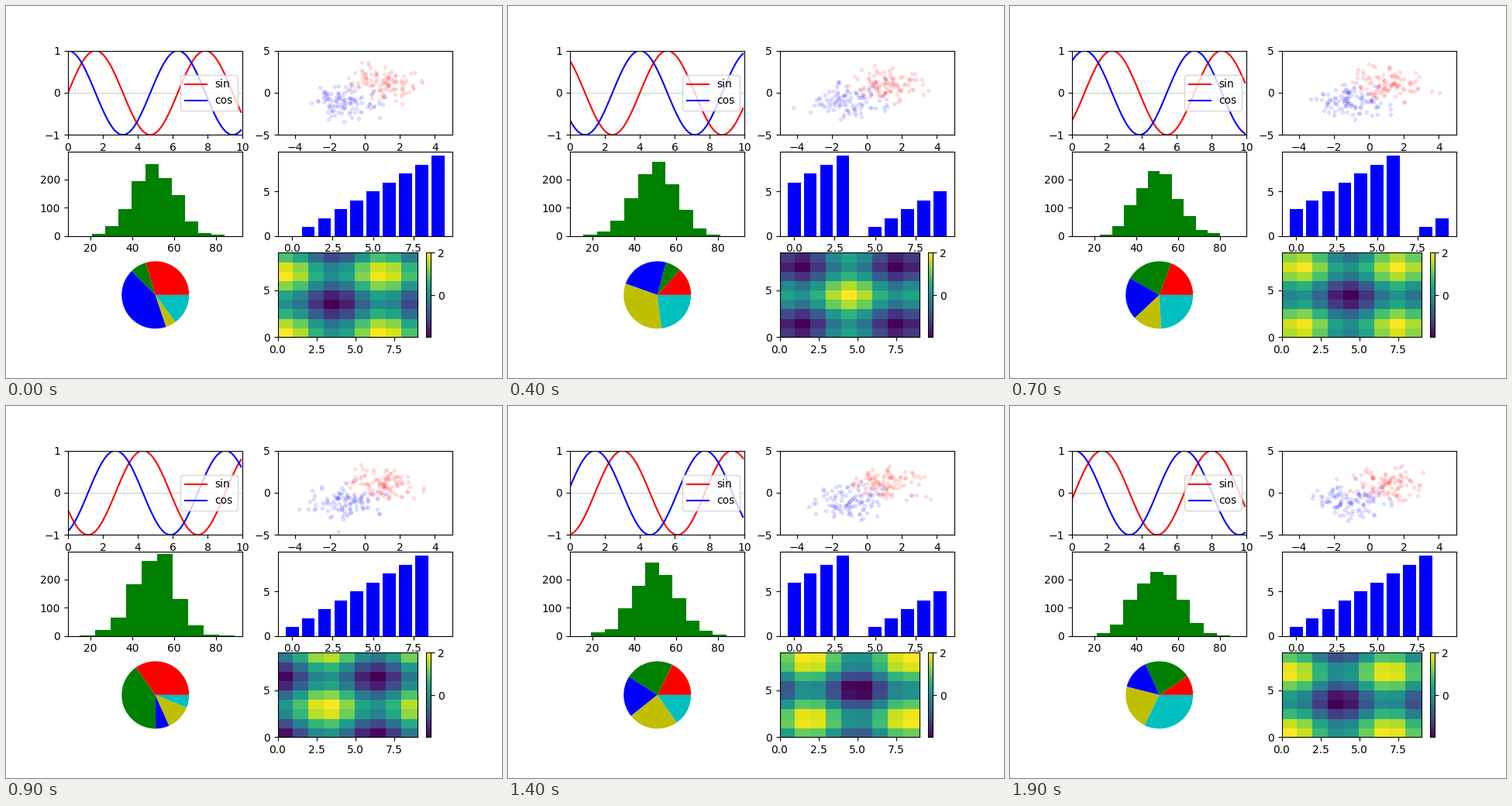
Write a matplotlib script that moves like this. It is 640x480 px and loops after 2 s.

```python
import numpy as np
import matplotlib.pyplot as plt
from matplotlib.animation import FuncAnimation
from matplotlib.cm import ScalarMappable
from matplotlib.colors import Normalize

FRAMES, INTERVAL = 20, 100
SEED = 100

fig, axes = plt.subplots(3, 2, figsize=(6.4, 4.8), dpi=100)
(ax_wave, ax_dots), (ax_hist, ax_bar), (ax_pie, ax_heat) = axes

# Waves
x = np.arange(0, 10, 0.1)
ax_wave.axhline(0, color="green", linestyle=":", linewidth=0.5, zorder=1)
sin_line, = ax_wave.plot(x, np.sin(x), "r", label="sin")
cos_line, = ax_wave.plot(x, np.cos(x), "b", label="cos")
ax_wave.set(xlim=(0, 10), ylim=(-1, 1))
ax_wave.legend(loc="center right")

# Two clouds of points
red_dots, = ax_dots.plot([], [], "ro", markersize=3, alpha=0.1)
blue_dots, = ax_dots.plot([], [], "bo", markersize=3, alpha=0.1)
ax_dots.set(xlim=(-5, 5), ylim=(-5, 5))

# Histogram
hist_bars = ax_hist.bar(range(10), [0] * 10, align="edge", color="green")
ax_hist.set(xlim=(9.3, 92.8), ylim=(0, 298.2))

# Rotating bars, limits follow from the first heights
places = np.arange(10)
bars = ax_bar.bar(places, places, color="blue")

# Pie
wedges, _ = ax_pie.pie([1] * 5, colors=["r", "g", "b", "y", "c"])

# Heat map with a fixed colour scale beside it
cells = np.arange(9)
heat = ax_heat.pcolor(np.arange(10), np.arange(10), np.zeros((9, 9)),
                      cmap="viridis")
scale = ScalarMappable(Normalize(2 * np.cos(3), 2), "viridis")
fig.colorbar(scale, ax=ax_heat, ticks=[0, 2])


def update(step):
    rng = np.random.default_rng(SEED + step)

    sin_line.set_ydata(np.sin(x - step))
    cos_line.set_ydata(np.cos(x - step))

    red_dots.set_data(*rng.normal(1, 1, (2, 100)))
    blue_dots.set_data(*rng.normal(-1, 1, (2, 100)))

    samples = np.clip(rng.normal(50, 10, 1000), 13, 89)
    counts, edges = np.histogram(samples, bins=10)
    for bar, left, right, count in zip(hist_bars, edges, edges[1:], counts):
        bar.set_bounds(left, 0, right - left, count)

    for bar, height in zip(bars, (places - step) % 10):
        bar.set_height(height)

    ends = np.cumsum(rng.random(5))
    ends *= 360 / ends[-1]
    for wedge, start, end in zip(wedges, [0, *ends], ends):
        wedge.set_theta1(start)
        wedge.set_theta2(end)

    wave = np.cos(cells - step)
    heat.set_array(wave[:, None] + wave[None, :])
    heat.autoscale()
    return []


anim = FuncAnimation(fig, update, frames=FRAMES, interval=INTERVAL,
                     init_func=lambda: update(0), repeat=True, repeat_delay=0)
plt.show()
```
